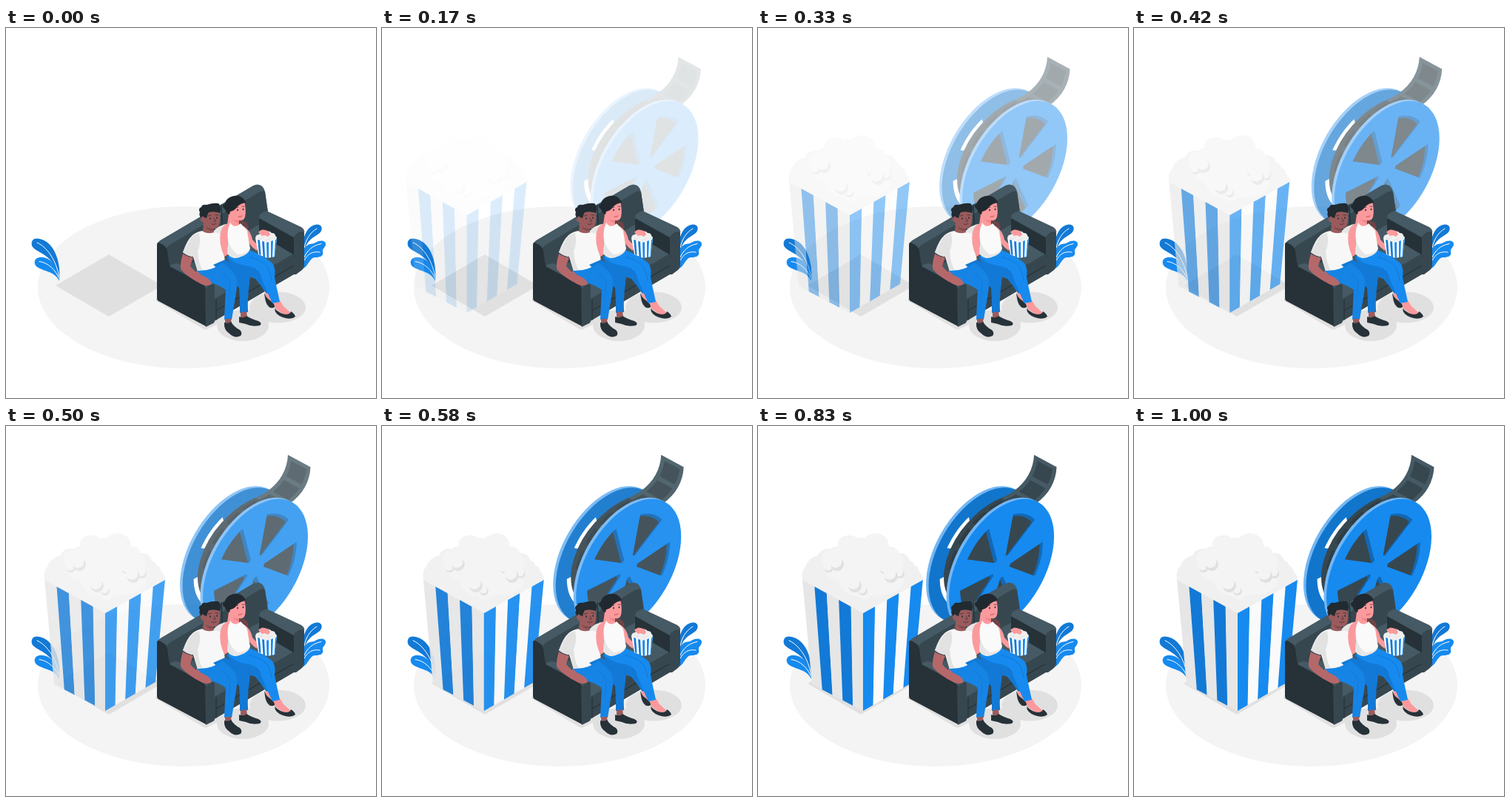
An HTML page with a canvas for the animation above (1.04 s loop, 500 by 500 pixels).

```html
<!DOCTYPE html>
<html lang="en">
<head>
<meta charset="utf-8">
<title>Movie night</title>
<style>
html, body { margin: 0; width: 100%; height: 100%; overflow: hidden; background: #fff; }
canvas { display: block; width: 500px; height: 500px; }
</style>
</head>
<body>
<canvas id="stage"></canvas>
<script>
const SIZE = 500, LOOP = 1040, STEPS = 25, SHIFT = 30;
const BLUE = '#168aef', DEEP = '#1279d6', PALE = '#74b7f4';
const INK = '#263238', SLATE = '#37474f', STEEL = '#455a64';
const BROWN = '#9a5b5d', PINK = '#fb9a9c', SHADE = '#e0e0e0';

const dpr = window.devicePixelRatio || 1;
const stage = document.getElementById('stage');
const screen2d = stage.getContext('2d');
const makeCanvas = () => Object.assign(document.createElement('canvas'), { width: SIZE * dpr, height: SIZE * dpr });
stage.width = stage.height = SIZE * dpr;
let c = screen2d;

function fill(color, d) {
  c.fillStyle = color;
  c.fill(new Path2D(d));
}
function line(color, width, d) {
  c.strokeStyle = color;
  c.lineWidth = width;
  c.lineCap = c.lineJoin = 'round';
  c.stroke(new Path2D(d));
}
function oval(color, x, y, rx, ry = rx, turn = 0) {
  c.fillStyle = color;
  c.beginPath();
  c.ellipse(x, y, rx, ry, turn, 0, 7);
  c.fill();
}
function poly(color, pts) {
  c.fillStyle = color;
  c.beginPath();
  pts.forEach(p => c.lineTo(p[0], p[1]));
  c.fill();
}
const mix = (a, b, k) => [a[0] + (b[0] - a[0]) * k, a[1] + (b[1] - a[1]) * k];

function bezier(p0, p1, p2, p3, s) {
  const r = 1 - s;
  return r * r * r * p0 + 3 * r * r * s * p1 + 3 * r * s * s * p2 + s * s * s * p3;
}
// cubic-bezier(.36, -.01, .5, 1.38)
function ease(t) {
  let lo = 0, hi = 1;
  for (let i = 0; i < 30; i++) {
    const m = (lo + hi) / 2;
    if (bezier(0, .36, .5, 1, m) < t) lo = m; else hi = m;
  }
  return bezier(0, -.01, 1.38, 1, lo);
}

function ground() {
  oval('#f4f4f4', 240, 350.5, 197, 109.5);
  fill(SHADE, 'M139 306 L211 348 L139 390 L67 348Z');
  fill(DEEP, 'M72 341 C75 312 62 285 42 284.5 C35 284 33 291 36 296 C43 305 66 305 72 341Z');
  fill(BLUE, 'M72 342 C71 319 57 308 45 310 C38 311 37 318 41 322 C49 329 66 328 72 342Z');
  line('#fff', 1, 'M42 290 C56 296 68 315 71.5 335 M45 315.5 C57 317 67 327 71.5 338');
  fill(DEEP, 'M400 300 C401 280 408 266 421 265.500 C428 266 428 273 424 277 C417 283 407 284 402 304Z');
  fill(BLUE, 'M400 326 L402 300 C408 289 415 293 418 290 C425 286 432 287 432 292 C432 297 427 298 428 302 C430 309 423 310 417 310 C410 311 408 323 400 326Z');
  line('#fff', 1, 'M420 271 C410 277 405 287 403 297 M426 291.5 C414 294 407 300 402 312 M424 303 C414 301 407 306 403 314');
  fill(SHADE, 'M202 368 L267 407 Q270 408.500 274 406 L292 397 L280 380 L210 350Z');
  oval(SHADE, 320, 402, 35, 21);
  oval(SHADE, 367, 377.5, 38, 21);
}

function popcorn() {
  const rim = [[58, 207], [140, 252], [221, 207]];
  const base = [[71, 349], [140, 385], [208, 346]];
  const colors = [['#e6e6e6', DEEP], [BLUE, '#fafafa']];
  for (let side = 0; side < 2; side++) {
    for (let i = 0; i < 5; i++) {
      const a = i / 5, b = (i + 1) / 5 + (i < 4 ? .004 : 0);
      const up = k => mix(rim[side], rim[side + 1], k);
      const down = k => mix(base[side], base[side + 1], k);
      poly(colors[side][i % 2], [up(a), up(b), down(b), down(a)]);
    }
  }
  fill('#f0f0f0', 'M58 208 Q56 196 62 190 Q66 178 79 175 Q84 164 97 166 Q102 162 106 163 Q105 149 120 148 Q127 147 132 152 Q137 150 142 152 Q149 144 160 145.500 Q174 148 175 163 Q186 163 188 172 Q199 170 203 182 Q208 183 209 188 Q215 190 216 197 Q221 201 221 208 L140 253Z');
  fill('#f4f4f4', 'M85 185 Q80 170 96 167 L106 163 Q105 149 120 148 Q127 147 132 152 Q137 150 142 152 Q149 144 160 145.500 Q174 148 175 163 Q186 163 188 172 Q199 180 192 194 L195 212 Q186 226 172 227 L150 230 Q144 240 132 230 Q112 228 106 208 Q92 210 85 185Z');
  const lump = (x, y, r) => {
    oval(SHADE, x, y, r);
    oval('#f4f4f4', x - r * .22, y - r * .4, r * .93);
  };
  [[94, 192, 6], [105, 187, 9], [140, 223, 6], [129, 216, 9], [169, 194, 6], [190, 200, 6], [178, 203, 9]]
    .forEach(l => lump(...l));
}

function disc(color, x, y, r) {
  c.save();
  c.transform(.866, -.5, 0, 1, x, y);
  oval(color, 0, 0, r);
  c.restore();
}
// the five wedge openings of a reel side, as one path
function wedges(x, y) {
  const path = new Path2D(), rad = Math.PI / 180;
  const at = (r, deg) => {
    const u = r * Math.cos(deg * rad), v = r * Math.sin(deg * rad);
    return [x + .866 * u, y + v - .5 * u];
  };
  for (let i = 0; i < 5; i++) {
    const mid = 17.5 + 72 * i;
    path.moveTo(...at(14, mid - 8));
    for (let d = -19; d <= 19; d += 2) path.lineTo(...at(64.5, mid + d));
    path.lineTo(...at(14, mid + 8));
    path.closePath();
  }
  return path;
}

function reel() {
  disc(PALE, 300, 173, 82);
  disc('#1175cc', 303.5, 175, 82);
  c.fillStyle = '#fff';
  c.fill(wedges(303.5, 175));
  for (let k = 0; k <= 1; k += .05) disc(SLATE, 305 + 26 * k, 175 + 15 * k, 60);

  const curves = [[375, 39, 374, 62, 360, 85, 331, 97], [331, 97, 299, 110, 263, 145, 253, 200]];
  const edge = (n, s, w) => {
    const b = curves[n];
    return [bezier(b[0], b[2], b[4], b[6], s) + 30.5 * w, bezier(b[1], b[3], b[5], b[7], s) + 16.5 * w];
  };
  const band = (color, n, s0, s1, w0, w1) => {
    const pts = [];
    for (let i = 0; i <= 10; i++) pts.push(edge(n, s0 + (s1 - s0) * i / 10, w0));
    for (let i = 10; i >= 0; i--) pts.push(edge(n, s0 + (s1 - s0) * i / 10, w1));
    poly(color, pts);
  };
  band(SLATE, 1, 0, 1, 0, .9);
  for (let i = 0; i < 4; i++) band('#2f3d45', 1, .05 + i * .24, .22 + i * .24, .14, .84);
  band(STEEL, 0, 0, 1, 0, 1);
  [[.08, .39], [.47, .75], [.82, 1]].forEach(([a, b]) => band(SLATE, 0, a, b, .16, .84));

  disc(PALE, 327.5, 188.5, 82);
  disc(BLUE, 331, 190.3, 82);
  const holes = wedges(331, 190.3);
  c.save();
  c.clip(holes);
  c.fillStyle = '#1268b5';
  c.fill(holes);
  c.fillStyle = SLATE;
  c.fill(wedges(326.5, 193.5));
  c.restore();
}

function sofa() {
  fill(STEEL, 'M204 293 Q205 289 210 286 L334 213 Q340 210 345 213 Q349 216 350 222 L354 249 L343 264 L222 335Z');
  fill(SLATE, 'M217 300 Q217 296 221 293 L340 223 Q346 219 350 221 L354 249 L346 275 L300 300 L222 340Z');
  line(INK, 1.5, 'M291 239 L293 282');
  fill(STEEL, 'M222 335 L343 265 L389 290 L389 307 L282 368Z');
  fill(SLATE, 'M280 367 L389 305 L389 333 L280 397Z');
  line(INK, 1.2, 'M284 382 L389 321 M284 367 L284 394');
  fill(INK, 'M342 254 L391 281 L390 307 L358 288 L342 274Z');
  fill(SLATE, 'M389 282 Q390 276 397 273 Q403 271 403 276 L403 320 Q403 324 400 327 L392 333 L389 333Z');
  fill(STEEL, 'M342 257 Q342 252 346 250 L352 247 L399 269 Q404 272 403 277 Q400 273 394 277 Q390 279 389 283Z');
  fill(STEEL, 'M221 322 Q224 318 232 318 L278 343 Q283 346 282 350 L270 356 L264 346Z');
  fill(INK, 'M204 293 Q204 288 209 291 L215 295 Q217 297 218 301 L221 322 L266 346 Q270 349 270 354 L270 403 L206 369 Q204 368 204 365Z');
  fill(SLATE, 'M269 355 Q270 350 276 347 Q282 344 282 350 L282 396 Q282 398 280 399 L270 404Z');
}

function manTop() {
  fill('#e6e6e6', 'M280 275 Q287 266 302 264 L303 277 L292 292Z');
  fill('#f7f7f7', 'M266 274 L287 277 Q294 280 294 296 L296 318 Q278 332 259 329 L253 309 Q245 308 239 303 Q245 286 252 280 Q258 275 266 274Z');
  fill('#e2e2e2', 'M261 277 Q252 279 249 285 L239 303 Q246 309 254 309 Q263 299 262 284Z');
  fill('#e2e2e2', 'M254 307 L259 329 Q263 330 267 329 Q260 320 259 301Z');
  fill('#b5686a', 'M239 305 Q246 310 253 310 Q250 318 249 322 Q258 333 269 336 Q277 340 278 346 Q271 350 264 346 Q247 338 237 327 Q234 322 239 305Z');
  fill(BROWN, 'M268 250 L288 246 Q291 258 288 266 Q286 272 280 271 L281 276 Q274 279 266 275 L267 263 Q262 262 263 256 Q265 252 268 255Z');
  fill('#824a4d', 'M270 268 Q275 272 280 271 L280 274 Q273 275 270 268Z');
  fill('#212b31', 'M264 257 Q260 253 262 249 Q259 244 264 242 Q265 238 271 239 Q280 236 287 237 Q292 241 289 250 Q281 247 274 249 Q272 252 271 257 L268 256 Q265 252 264 257Z');
  oval(INK, 276, 257.5, .9, 1.2);
  oval(INK, 285, 256.5, .9, 1.2);
  line('#4a2b2e', .8, 'M273 254 L277 253 M283 252.5 L287 253 M278 265 Q281 266.500 284 264.500 M281 257 L283 261 L281 261.500');
}

function woman() {
  fill(INK, 'M349 358 Q351 363 355 366 L363 374 Q365 379 357 378 Q351 374 350 365Z');
  fill(PINK, 'M350 355 L357 359 L361 369 Q354 368 351 362Z');
  fill(PINK, 'M361 370 L370 368 L375 376 L386 386 L376 388 L364 379Z');
  fill(INK, 'M363 379 Q370 386 378 387 Q384 387 385 383 Q390 386 391 390 Q385 395 374 391 Q363 387 363 379Z');
  fill(DEEP, 'M299 309 L326 303 Q344 313 347 329 Q354 343 359 360 L351 358 Q344 347 337 339 L316 331 Q301 321 299 309Z');
  fill(BLUE, 'M299 308 Q313 310 329 300 Q352 310 360 318 Q365 324 363 337 Q366 352 370 370 L360 372 Q350 350 345 338 Q344 326 329 322 Q307 319 299 308Z');
  line(DEEP, 1, 'M329 309 Q351 317 354 324 Q358 331 359 341');
  fill(PINK, 'M300 264 Q292 267 290 276 Q287 291 295 309 L300 306 Q298 292 302 278Z');
  fill(PINK, 'M301 251 L314 258 L315 265 L323 269 Q331 275 333 286 L341 294 L339 301 Q328 294 325 283 L302 274 L299 266Z');
  fill('#fafafa', 'M303 263 Q309 272 317 264 Q322 269 326 274 Q328 288 330 298 Q327 308 309 311 Q301 309 299 304 Q300 294 300 285 Q298 274 303 263Z');
  fill('#e6e6e6', 'M300 286 Q303 299 313 306 Q321 306 329 300 Q325 309 309 311 Q301 309 299 304Z');
  fill('#704346', 'M313 262 Q320 258 326 264 L328 271 Q321 269 319 265Z');
  fill(PINK, 'M302 240 L322 234 Q325 248 323 255 Q322 261 315 260 Q302 258 300 249Z');
  fill('#ee8388', 'M307 258 Q311 261 315 260 L315 264 Q309 263 307 258Z');
  fill('#20292f', 'M293 238 Q295 240 297 234 Q301 227 311 226.500 Q321 227 324 236 Q317 237 313 241 Q309 247 303 248 L302 252 Q297 250 296 245 Q292 243 293 238Z');
  oval(INK, 313, 246, .9, 1.2);
  oval(INK, 320.5, 245, .9, 1.2);
  line('#a13f49', .8, 'M314 255 Q317 255.500 319 254');
  line(INK, .7, 'M312 242.500 L314 242 M319 241 L322 241.500');
}

function snack() {
  fill('#fff', 'M337 284 L351 289 L366 284 L363 309 L353 311 L341 306Z');
  fill(DEEP, 'M340 285 L343 286 L344.500 307 L342 306Z M346 287 L349 288 L350 310 L347.500 309Z');
  fill(BLUE, 'M352 289 L355 288 L355 311 L352.500 311Z M358 287 L361 286 L360 310 L358 310Z M364 284.500 L366 284 L363.500 309 L362.500 309Z');
  fill('#efefef', 'M337 285 Q337 279 342 279 Q345 274 350 277 Q355 272 359 277 Q364 277 364 281 Q367 282 365 286 L352 290Z');
  fill(PINK, 'M341 276 Q345 271 350 273 Q356 274 357 279 L354 282 Q350 279 346 281Z');
  line(SHADE, 1, 'M342 284 Q345 286 347 283 M354 286 Q357 286 358 283');
}

function manLegs() {
  fill(DEEP, 'M280 320 L296 313 Q313 324 325 331 Q331 335 329 345 Q326 365 327 384 L316 385 Q316 365 315 351Z');
  fill(BROWN, 'M317 384 L325 383 L326 391 L317 393Z');
  fill(INK, 'M315 390 Q321 393 325 389 Q331 393 341 396 Q347 399 343 402 Q332 404 324 400 L315 398Z');
  fill('#1684e5', 'M258 328 Q279 329 292 317 Q304 325 310 334 Q314 341 311 358 L305 394 L295 394 Q296 370 297 354 Q288 347 276 344 L269 336 Q260 335 258 328Z');
  line(DEEP, 1, 'M291 331 Q302 336 303 346 L301 366');
  fill('#b5686a', 'M258 328 Q263 334 269 336 Q277 340 278 346 Q271 350 264 346 L252 338Z');
  fill(BROWN, 'M296 393 L304 393 L305 401 L296 401Z');
  fill(INK, 'M295 398 Q300 400 304 397 Q308 404 316 408 Q320 412 317 416 Q309 420 302 413 Q294 408 295 398Z');
}

const layer = makeCanvas(), layer2d = layer.getContext('2d');
const front = makeCanvas();

function reset(ctx) {
  ctx.setTransform(1, 0, 0, 1, 0, 0);
  ctx.clearRect(0, 0, SIZE * dpr, SIZE * dpr);
  ctx.setTransform(dpr, 0, 0, dpr, 0, 0);
}
// draws a part as one group, moved sideways and faded as a whole
function group(part, dx, alpha) {
  reset(layer2d);
  layer2d.translate(dx, 0);
  c = layer2d;
  part();
  c = screen2d;
  c.globalAlpha = alpha;
  c.drawImage(layer, 0, 0, SIZE, SIZE);
  c.globalAlpha = 1;
}

c = front.getContext('2d');
reset(c);
[sofa, manTop, woman, snack, manLegs].forEach(part => part());
c = screen2d;

function draw(ms) {
  const step = Math.floor((ms % LOOP) / (LOOP / STEPS) + .1) % STEPS;
  const k = ease(Math.min(1, (step + 1) / 24.5));
  const alpha = Math.max(0, Math.min(1, k)), dx = SHIFT * (1 - k);
  reset(screen2d);
  ground();
  if (step > 0) {
    group(reel, dx, alpha);
    group(popcorn, -dx, alpha);
  }
  c.drawImage(front, 0, 0, SIZE, SIZE);
}

const start = performance.now();
function tick() {
  draw(performance.now() - start);
  requestAnimationFrame(tick);
}
draw(0);
requestAnimationFrame(tick);
</script>
</body>
</html>
```
